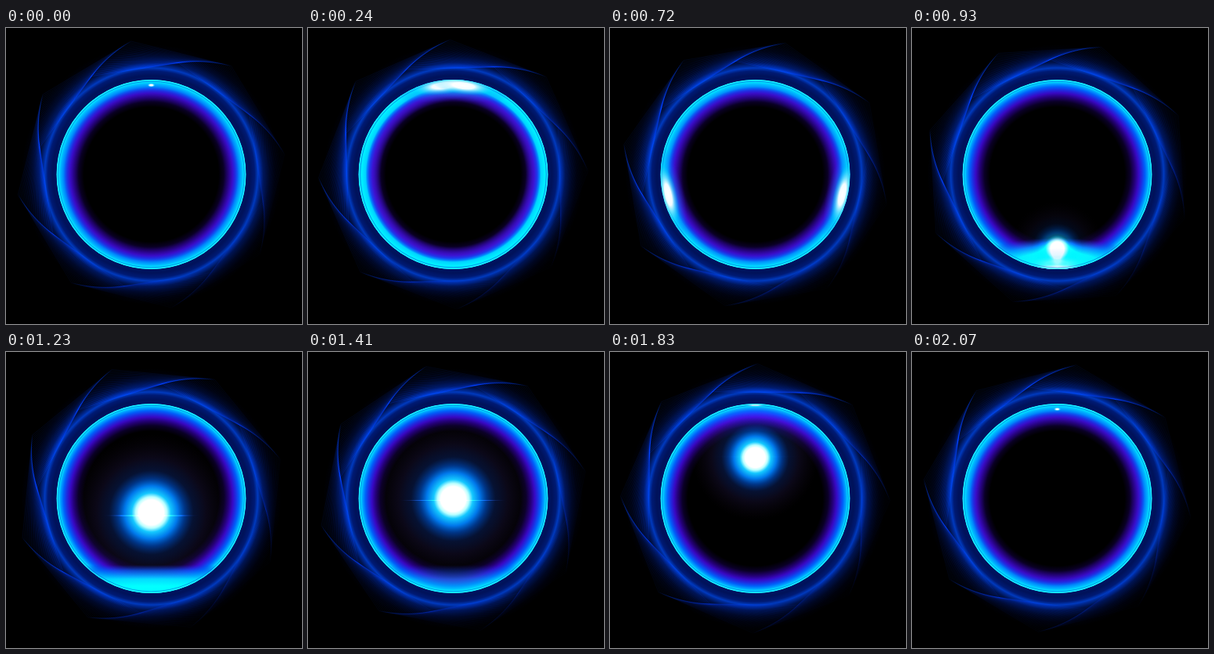
Animation of 378 by 378 pixels, one loop 2100 ms. Source, as an HTML page with a canvas:

```html
<!DOCTYPE html>
<html lang="en">
<head>
<meta charset="utf-8">
<title>Glowing ring</title>
<style>
  html, body { margin: 0; width: 100%; height: 100%; overflow: hidden; background: #000; }
  canvas { display: block; width: 378px; height: 378px; }
</style>
</head>
<body>
<canvas id="stage" width="378" height="378"></canvas>
<script>
const ctx = document.getElementById('stage').getContext('2d');
const LOOP = 2100, STEP = 30, CX = 185.5, CY = 187, R = 121;
const TAU = Math.PI * 2, RAD = Math.PI / 180;

const ramp = (t, a, b) => Math.max(0, Math.min(1, (t - a) / (b - a)));
const smooth = (t, a, b) => { const k = ramp(t, a, b); return k * k * (3 - 2 * k); };

function addStops(gradient, stops, scale = 1) {
  for (const [at, color] of stops) gradient.addColorStop(at / scale, color);
  return gradient;
}

const ringFill = (r, stops) =>
  addStops(ctx.createRadialGradient(CX, CY, 0, CX, CY, r), stops, r);

function circle(x, y, r) {
  ctx.beginPath();
  ctx.arc(x, y, r, 0, TAU);
}

function disc(r, fill, alpha = 1) {
  ctx.globalAlpha = alpha;
  ctx.fillStyle = fill;
  circle(CX, CY, r);
  ctx.fill();
  ctx.globalAlpha = 1;
}

// Radial glow squeezed into an ellipse
function glow(x, y, rx, ry, angle, alpha, stops) {
  if (alpha <= 0 || rx <= 0 || ry <= 0) return;
  ctx.save();
  ctx.translate(x, y);
  ctx.rotate(angle);
  ctx.scale(rx, ry);
  ctx.globalAlpha = alpha;
  ctx.fillStyle = addStops(ctx.createRadialGradient(0, 0, 0, 0, 0, 1), stops);
  circle(0, 0, 1);
  ctx.fill();
  ctx.restore();
}

const auraFill = ringFill(166, [
  [119, 'rgb(0,20,100)'], [126, 'rgb(0,18,90)'], [132, 'rgb(0,26,115)'],
  [136, 'rgb(0,58,190)'], [138, 'rgb(0,42,150)'], [143, 'rgb(0,18,74)'],
  [151, 'rgb(0,6,30)'], [158, 'rgb(0,1,9)'], [166, '#000']
]);

const rimFill = ringFill(R, [
  [0, '#000'], [86, '#000'], [93, 'rgb(10,0,38)'], [99, 'rgb(36,0,118)'],
  [104, 'rgb(56,8,195)'], [108, 'rgb(30,45,225)'], [112, 'rgb(0,95,250)'],
  [116, 'rgb(0,165,255)'], [118, 'rgb(0,220,255)'], [121, 'rgb(0,205,255)']
]);

const rimBoost = ringFill(R, [
  [0, 'rgba(60,20,210,0)'], [92, 'rgba(60,20,210,0)'], [103, 'rgba(64,22,215,.8)'],
  [107, 'rgba(30,60,240,.9)'], [110, 'rgb(0,140,255)'], [112, 'rgb(0,225,255)'],
  [117, 'rgb(0,245,255)'], [121, 'rgb(0,215,255)']
]);

const webStroke = addStops(ctx.createLinearGradient(75, 60, 310, 310), [
  [0, 'rgba(0,65,255,1)'], [0.5, 'rgba(0,60,255,.75)'], [1, 'rgba(0,50,255,.15)']
]);

const SPARK = [
  [0, '#fff'], [0.35, 'rgba(255,255,255,.95)'], [0.6, 'rgba(170,240,255,.5)'],
  [1, 'rgba(0,200,255,0)']
];
const SHEEN = [
  [0, 'rgba(0,240,255,.9)'], [0.5, 'rgba(0,190,255,.5)'], [1, 'rgba(40,60,255,0)']
];
const ORB = [
  [0, '#fff'], [0.16, '#fff'], [0.2, 'rgb(185,255,255)'], [0.25, 'rgb(20,200,255)'],
  [0.34, 'rgb(0,120,235)'], [0.43, 'rgba(0,75,190,.7)'], [0.54, 'rgba(12,35,100,.5)'],
  [0.7, 'rgba(22,16,48,.5)'], [1, 'rgba(18,8,24,0)']
];
const POOL = [
  [0, 'rgb(0,255,255)'], [0.5, 'rgb(0,245,255)'], [0.72, 'rgba(0,160,255,.75)'],
  [1, 'rgba(40,30,220,0)']
];

// Nested octagons, each with its corners on the sides of the one around it
function drawWeb(t) {
  const layers = 26, sides = 8, twist = 0.9 * RAD, half = Math.PI / sides;
  const shrink = Math.cos(half) / Math.cos(half - twist);
  ctx.save();
  ctx.globalCompositeOperation = 'lighter';
  ctx.strokeStyle = webStroke;
  ctx.lineWidth = 0.7;
  for (let i = 0; i < layers; i++) {
    const r = 172 * Math.pow(shrink, i);
    const turn = (-98.7 + t * 0.0298) * RAD - i * twist;
    ctx.globalAlpha = 0.13 + 0.12 * i / layers;
    ctx.beginPath();
    for (let s = 0; s < sides; s++) {
      const a = turn + s * TAU / sides;
      ctx.lineTo(CX + r * Math.cos(a), CY + r * Math.sin(a));
    }
    ctx.closePath();
    ctx.stroke();
  }
  ctx.restore();
}

function drawEdge() {
  circle(CX, CY, 118.8);
  ctx.lineWidth = 0.9;
  ctx.strokeStyle = 'rgba(0,110,220,.7)';
  ctx.stroke();
  circle(CX, CY, 120.5);
  ctx.lineWidth = 1.5;
  ctx.strokeStyle = 'rgb(30,240,255)';
  ctx.stroke();
}

// Two sparks split at the top and meet at the bottom
function drawSparks(t) {
  const turn = Math.PI * Math.pow(ramp(t, 0, 900), 2.5);
  const grow = smooth(t, 0, 230);
  const fade = 1 - smooth(t, 840, 960);
  const spots = [-turn, turn].map(a => [CX + 114 * Math.sin(a), CY - 114 * Math.cos(a), a]);
  for (const [x, y, a] of spots) glow(x, y, 70, 20, a, grow * fade * 0.8, SHEEN);
  for (const [x, y, a] of spots) glow(x, y, 5 + 35 * grow, 2.5 + 8.5 * grow, a, fade, SPARK);
  glow(CX, 73, 5, 2.5, 0, smooth(t, 1980, 2050), SPARK);
}

function drawPool(t) {
  const flat = smooth(t, 850, 1130) * (1 - smooth(t, 1240, 1520));
  const swell = smooth(t, 740, 920) * (1 - smooth(t, 980, 1200));
  if (flat > 0) {
    ctx.globalAlpha = flat;
    ctx.fillStyle = addStops(ctx.createLinearGradient(0, 272, 0, 308), [
      [0, 'rgba(10,50,220,0)'], [0.2, 'rgba(0,100,245,.7)'],
      [0.5, 'rgb(0,215,255)'], [0.75, 'rgb(0,255,255)'], [1, 'rgb(0,255,255)']
    ]);
    ctx.fillRect(60, 272, 252, 40);
    ctx.globalAlpha = 1;
  }
  glow(CX, 304, 118, 36, 0, swell, POOL);
  glow(CX, 307, 62, 6, 0, swell, SPARK);
}

function drawOrb(t) {
  const size = Math.min(0.45 + 0.55 * smooth(t, 800, 1180), 1 - 0.93 * smooth(t, 1740, 2040));
  const alpha = smooth(t, 780, 1080) * (1 - smooth(t, 1980, 2050));
  if (alpha <= 0) return;
  const d = t - 1450;
  const y = Math.max(73, Math.min(302, 185 - 0.0699 * d - 4.3e-7 * d * d * d));
  const birth = smooth(t, 820, 920) * (1 - smooth(t, 980, 1120));
  ctx.globalCompositeOperation = 'lighter';
  glow(CX, y, 100 * size, 100 * size, 0, alpha, ORB);
  glow(CX, y, 17, 17, 0, birth * 0.9, SPARK);
  glow(CX, (y + 304) / 2, 12, 22, 0, birth * 0.6, SPARK);
  const streak = smooth(t, 1050, 1230) * (1 - smooth(t, 1680, 1850));
  const lag = 4 - 5 * ramp(t, 1230, 1620);
  glow(CX, y + lag, 68, 1.1, 0, streak * 0.7, [
    [0, 'rgb(40,120,230)'], [0.7, 'rgba(30,70,160,.7)'], [1, 'rgba(10,20,60,0)']
  ]);
  ctx.globalCompositeOperation = 'source-over';
}

function draw(t) {
  const boost = t < 1000
    ? (0.3 + 0.6 * smooth(t, 0, 240)) * (1 - smooth(t, 520, 900))
    : 0.3 * smooth(t, 1800, 2070);
  ctx.fillStyle = '#000';
  ctx.fillRect(0, 0, 378, 378);
  disc(166, auraFill);
  drawWeb(t);

  ctx.save();
  circle(CX, CY, R);
  ctx.clip();
  disc(R, rimFill);
  disc(R, rimBoost, boost);
  drawPool(t);
  drawOrb(t);
  drawEdge();
  drawSparks(t);
  glow(CX, 68, 14, 2, 0, smooth(t, 1500, 1620) * (1 - smooth(t, 1900, 2030)) * 0.7, SPARK);
  ctx.restore();
}

const start = performance.now();
function tick() {
  const t = (performance.now() - start) % LOOP;
  draw(Math.floor(t / STEP) * STEP);
  requestAnimationFrame(tick);
}
tick();
</script>
</body>
</html>
```
